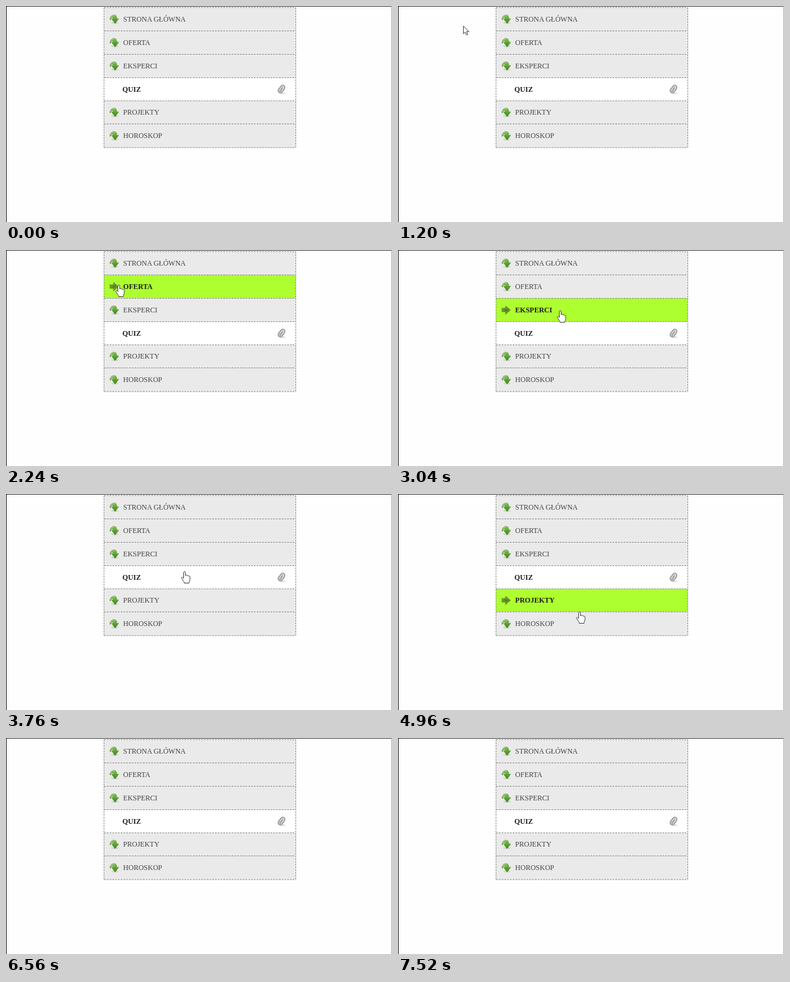
An HTML page that plays this animation: 640 by 360 pixels, repeating every 7600 ms.

```html
<!DOCTYPE html>
<html lang="pl">
<head>
<meta charset="utf-8">
<title>Menu</title>
<style>
html, body { margin: 0; width: 100%; height: 100%; overflow: hidden; background: #fefefe; }
svg { display: block; width: 640px; height: 360px; }
text { font: 12px "Liberation Serif", "Times New Roman", serif; fill: #444; }
.row rect { fill: #ebeaea; }
.row .over { display: none; }
.row.hover rect { fill: #adff2f; }
.row.hover text, .row.current text { font-weight: bold; fill: #1c1c1c; }
.row.hover .over { display: inline; }
.row.hover .rest { display: none; }
.row.current rect { fill: #fff; }
.dash { fill: none; stroke: #858585; stroke-dasharray: 3 1.6; }
</style>
</head>
<body>
<svg viewBox="0 0 640 360">
  <defs>
    <linearGradient id="green" x2="0" y2="1">
      <stop offset="0" stop-color="#8cc060"/>
      <stop offset=".5" stop-color="#58a52c"/>
      <stop offset="1" stop-color="#3a821b"/>
    </linearGradient>
    <g id="down">
      <ellipse cx="1" cy="6.2" rx="6" ry="1.6" fill="#cdd2c8"/>
      <path d="M-7.2 .8C-7-4-4.2-7-.4-7 3-7 4.2-4.4 4.2-.8H7.4L1.4 7.2-4.6-.8H-1.4C-1.4-3-3-3.8-4.6-2.4-5.6-1.5-6-.4-6 .8Z" fill="url(#green)" stroke="#4c8c2b" stroke-width=".6"/>
      <path d="M-6.2-1.5C-5-5.2-2.4-6.2 0-5.8" fill="none" stroke="#b5d99b" stroke-width="1"/>
    </g>
    <g id="right">
      <path d="M-7-3H-1V-6.6L6.8 0-1 6.6V3H-7Z" fill="#719f2c"/>
      <path d="M-7-3H-1V-6.6L6.8 0-1 6.6V3H-7ZM-5 0H4M-3-2.5 3 2.5M-3 2.5 3-2.5" fill="none" stroke="#4d682b" stroke-width="1.2" stroke-dasharray="1.5 1"/>
    </g>
  </defs>
  <g id="menu"></g>
  <g transform="translate(456.7 138.7) rotate(35)">
    <ellipse cx="2" cy="6.5" rx="5" ry="1.5" fill="#e3e3e3" transform="rotate(-35)"/>
    <rect x="-4" y="-7.5" width="8" height="14.5" rx="4" fill="#b4b4b4" stroke="#8e8e8e"/>
    <path d="M-1.6 4V-3.5a1.7 1.7 0 0 1 3.4 0V3" fill="none" stroke="#ededed" stroke-width="1"/>
    <path d="M0 3.5V-3" stroke="#858585" stroke-width="1"/>
  </g>
  <path d="M0 .5H640" stroke="#333"/>
  <path d="M.5 0V360" stroke="#111"/>
  <path d="M639.5 0V360" stroke="#aaa"/>
  <g id="cursor" stroke="#3c3c3c" stroke-width="1" stroke-linejoin="round" fill="#fff">
    <path id="arrow" d="M.5.5V13.2L3.4 10.5 5.5 15.4 7.7 14.4 5.6 9.7H9.5Z"/>
    <path id="hand" d="M-1.5 11.5V1.8C-1.5 0 1.5 0 1.5 1.8V7C1.8 5.7 4 5.8 4.2 7.3 4.8 6.3 6.5 6.6 6.7 8 7.4 7.2 9 7.6 9 9V13.5C9 15.8 7.5 16.5 7.4 19.5H-.4C-.5 17-2.2 15.8-4.6 11.8-5.7 9.8-3.6 8.8-2.6 10.2Z"/>
  </g>
</svg>
<script>
const LOOP = 7600, STEP = 80, SHOW = 560, HIDE = 6400;
const LEFT = 162.5, RIGHT = 480.5, CURRENT = 3;
const labels = ["STRONA GŁÓWNA", "OFERTA", "EKSPERCI", "QUIZ", "PROJEKTY", "HOROSKOP"];
const edges = [2.5, 41.5, 80.5, 119.5, 158, 196.5, 236];

// time, x, y of the pointer tip
const path = [
  [560, 410, 264], [640, 330, 262], [720, 150, 242], [800, 95, 120],
  [880, 90, 10], [1040, 108, 33], [1200, 108, 33], [1280, 121, 31],
  [1440, 163, 25], [1600, 175, 22], [1920, 180, 25], [2000, 183, 48],
  [2240, 187, 58], [2480, 215, 75], [2640, 240, 90], [3200, 280, 105],
  [3440, 293, 117], [3600, 296, 126], [3760, 296, 129], [4160, 297, 145],
  [4320, 298, 164], [4720, 300, 185], [4960, 301, 196], [5280, 302, 224],
  [5440, 302, 232], [5520, 302, 240], [5680, 302, 250], [6080, 306, 288],
  [6320, 313, 328]
];

const get = id => document.getElementById(id);
const show = (el, on) => el.style.display = on ? "" : "none";

get("menu").innerHTML = labels.map((label, i) => {
  const top = edges[i], height = edges[i + 1] - top, mid = top + height / 2;
  const at = `x="179.5" y="${mid}"`;
  const icons = i === CURRENT ? "" :
    `<use class="rest" href="#down" ${at}/><use class="over" href="#right" ${at}/>`;
  return `<g class="row${i === CURRENT ? " current" : ""}">
    <rect x="${LEFT}" y="${top}" width="${RIGHT - LEFT}" height="${height}"/>${icons}
    <text x="${i === CURRENT ? 193 : 194.3}" y="${Math.round(mid + 4.2)}">${label}</text></g>`;
}).join("") +
  `<path class="dash" d="${edges.map(y => `M${LEFT} ${y}H${RIGHT}`).join("")}M${LEFT} 2.5V236M${RIGHT} 2.5V236"/>`;

const rows = document.querySelectorAll(".row");

function pointAt(t) {
  const next = path.findIndex(p => p[0] > t);
  if (next < 0) return path[path.length - 1].slice(1);
  const [t0, x0, y0] = path[Math.max(0, next - 1)], [t1, x1, y1] = path[next];
  const k = Math.max(0, (t - t0) / (t1 - t0));
  return [x0 + (x1 - x0) * k, y0 + (y1 - y0) * k];
}

function draw(now) {
  const t = Math.floor(now % LOOP / STEP) * STEP;
  const visible = t >= SHOW && t < HIDE;
  const [x, y] = pointAt(t);
  const inside = visible && x > LEFT && x < RIGHT;
  const active = inside ? labels.findIndex((_, i) => y >= edges[i] && y < edges[i + 1]) : -1;
  rows.forEach((row, i) => row.classList.toggle("hover", i === active && i !== CURRENT));
  show(get("cursor"), visible);
  show(get("hand"), active >= 0);
  show(get("arrow"), active < 0);
  get("cursor").setAttribute("transform", `translate(${Math.round(x)} ${Math.round(y)})`);
}

const start = performance.now();
function tick() {
  draw(performance.now() - start);
  requestAnimationFrame(tick);
}
tick();
</script>
</body>
</html>
```
